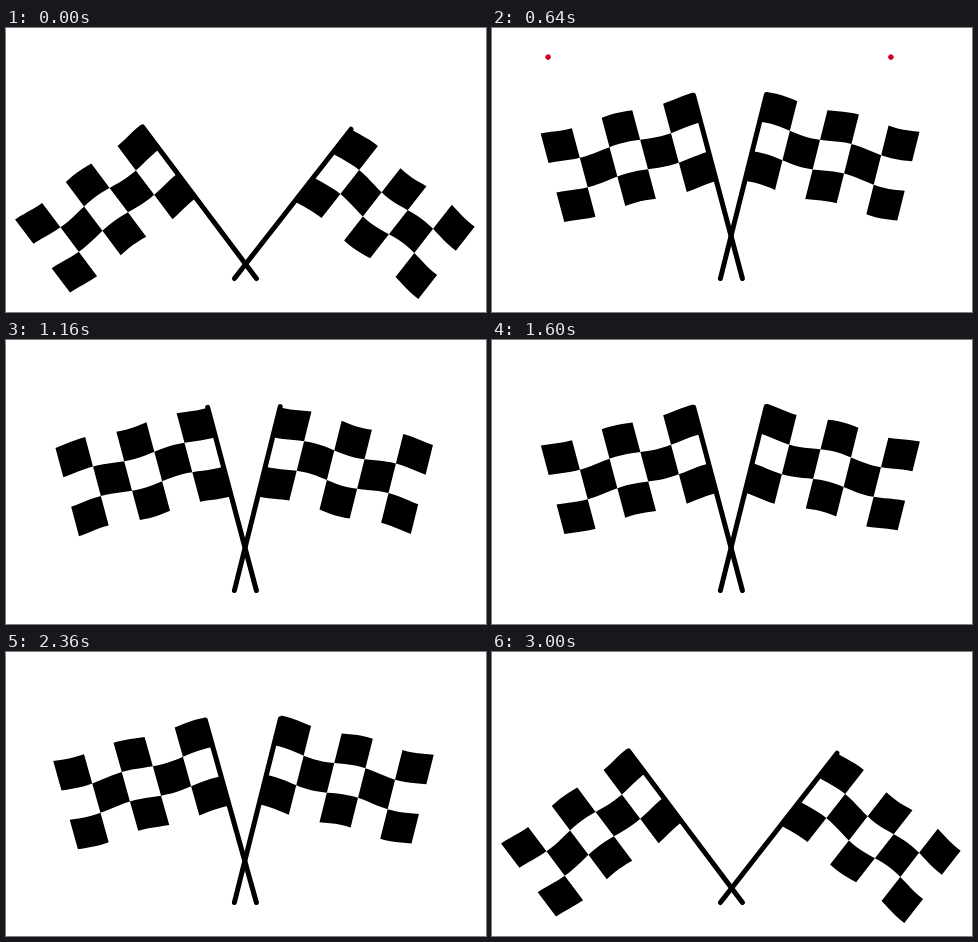
An HTML page that plays this animation: 480x284 px, repeating every 3040 ms.

```html
<!DOCTYPE html>
<html lang="en">
<head>
<meta charset="utf-8">
<title>Crossed race flags</title>
<style>
  html, body { margin: 0; width: 100%; height: 100%; overflow: hidden; background: #fff; }
  svg { display: block; width: 100vw; height: 100vh; }
</style>
</head>
<body>
<svg viewBox="0 0 480 284">
  <g id="sparks" fill="#d0021b"></g>
  <g id="flags"></g>
</svg>
<script>
const LOOP = 3040, STEP = 40;
const POLE = 189.5, CLOTH_TOP = -190.7, CELL_W = 31.5, CELL_H = 30.5, WAVE = 2.65;

const clamp = x => Math.min(1, Math.max(0, x));
const mix = (a, b, p) => a + (b - a) * p;
const easeOut = p => 1 - (1 - p) ** 3;
const easeIn = p => p ** 3;
const easeInOut = p => (1 - Math.cos(Math.PI * p)) / 2;

function add(parent, name, attrs = {}) {
  const el = document.createElementNS('http://www.w3.org/2000/svg', name);
  for (const key in attrs) el.setAttribute(key, attrs[key]);
  return parent.appendChild(el);
}

function sampleKeys(times, values, t) {
  let i = 1;
  while (i < times.length - 1 && t > times[i]) i++;
  const p = clamp((t - times[i - 1]) / (times[i] - times[i - 1]));
  return mix(values[i - 1], values[i], p);
}

// Ripples run toward the pole, four per loop; cycles counts those passed.
const rippleTimes = [0, 320, 640, 1160, 2000, 2640, 3000];
const OPENING = 735;
const flags = [
  {
    x: 250.4, flip: -1, raised: 14.9, lowered: 36.9,
    closeAt: 2280, closing: 680, closeEase: easeInOut,
    amp: 1.7, trough: 2.57, cycles: [0, .67, .99, 1.46, 2.4, 3.21, 4]
  },
  {
    x: 228.4, flip: 1, raised: 14, lowered: 38,
    closeAt: 2260, closing: 740, closeEase: easeIn,
    amp: 2.1, trough: .95, cycles: [0, .92, 1.23, 1.86, 2.96, 3.57, 4]
  }
];

const flagLayer = document.getElementById('flags');
for (const flag of flags) {
  flag.group = add(flagLayer, 'g');
  flag.cloth = add(flag.group, 'path');
  add(flag.group, 'path', {
    d: `M0 0V${-POLE}`, stroke: '#000', 'stroke-width': 5, 'stroke-linecap': 'round'
  });
}

function flagAngle({ raised, lowered, closeAt, closing, closeEase }, t) {
  return t < closeAt
    ? mix(lowered, raised, easeOut(clamp(t / OPENING)))
    : mix(raised, lowered, closeEase(clamp((t - closeAt) / closing)));
}

function clothPath(trough, amp) {
  const k = 2 * Math.PI / WAVE;
  const point = (col, row) => {
    const y = CLOTH_TOP + row * CELL_H - amp * Math.cos(k * (col - trough));
    return `${(col * CELL_W).toFixed(2)} ${y.toFixed(2)}`;
  };
  let d = '';
  for (let col = 0; col < 5; col++) {
    for (let row = col % 2; row < 3; row += 2) {
      const edge = [];
      for (let i = 0; i <= 6; i++) edge.push(point(col + i / 6, row));
      for (let i = 6; i >= 0; i--) edge.push(point(col + i / 6, row + 1));
      d += `M${edge.join('L')}Z`;
    }
  }
  return d;
}

// Each ray leaves the burst centre along (dx, dy), from one distance to another.
const rays = [
  { dx: -85, dy: -26, from: 57, to: 102, start: 225 },
  { dx: -8, dy: -65, from: 34, to: 80, start: 225 },
  { dx: -59, dy: -72, from: 34, to: 93, start: 300 }
];
const RAY_LIFE = 345, HEAD = 2.7;
const sparkLayer = document.getElementById('sparks');
const bursts = [1, -1].map(flip => {
  const group = add(sparkLayer, 'g', {
    transform: `translate(${flip > 0 ? 115 : 340} 101) scale(${flip} 1)`
  });
  return rays.map(ray => add(group, 'path', {
    transform: `rotate(${Math.atan2(ray.dy, ray.dx) * 180 / Math.PI})`
  }));
});
const specks = [[202, 183], [274, 186]].map(([cx, cy]) =>
  add(sparkLayer, 'circle', { cx, cy, r: 1.5 }));

function rayPath({ from, to, start }, t) {
  const p = (t - start) / RAY_LIFE;
  if (p <= 0 || p >= 1) return '';
  const head = mix(from, to, easeOut(p));
  const tail = mix(from, to, p * p);
  return `M${tail} -.6L${head} ${-HEAD}A${HEAD} ${HEAD} 0 0 1 ${head} ${HEAD}L${tail} .6Z`
    + `M${head - HEAD} 0a${HEAD} ${HEAD} 0 0 1 ${2 * HEAD} 0a${HEAD} ${HEAD} 0 0 1 ${-2 * HEAD} 0Z`;
}

function draw(t) {
  for (const flag of flags) {
    const trough = flag.trough - WAVE * sampleKeys(rippleTimes, flag.cycles, t);
    flag.group.setAttribute('transform',
      `translate(${flag.x} 250.5) scale(${flag.flip} 1) rotate(${flagAngle(flag, t)})`);
    flag.cloth.setAttribute('d', clothPath(trough, flag.amp));
  }
  for (const burst of bursts)
    burst.forEach((path, i) => path.setAttribute('d', rayPath(rays[i], t)));
  for (const speck of specks)
    speck.setAttribute('visibility', t >= 300 && t < 350 ? 'visible' : 'hidden');
}

const begin = performance.now();
function tick() {
  const t = (performance.now() - begin) % LOOP;
  draw(Math.floor(t / STEP) * STEP);
  requestAnimationFrame(tick);
}
tick();
</script>
</body>
</html>
```
